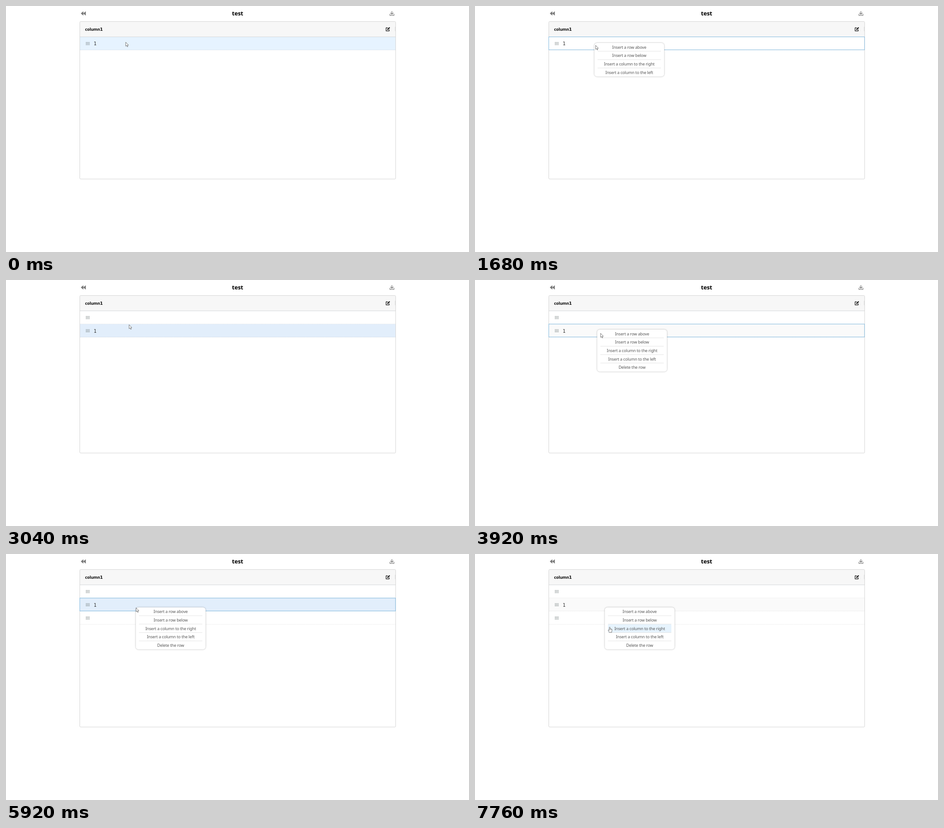
An HTML page for the animation above (8 s loop, 1026 by 546 pixels).

```html
<!DOCTYPE html>
<html lang="en">
<head>
<meta charset="utf-8">
<title>Table editor</title>
<style>
  html, body { margin: 0; width: 100%; height: 100%; overflow: hidden; background: #fff; }
  svg { display: block; width: 1026px; height: 546px; }
  text { font-family: "Noto Sans", "Open Sans", sans-serif; }
  .digit { font-family: "DejaVu Sans", sans-serif; }
  .menu text { font-size: 9px; letter-spacing: -.15px; fill: #555; text-anchor: middle; }
  .panel { filter: drop-shadow(0 0 1.5px rgba(0, 0, 0, .32)); }
</style>
</head>
<body>
<svg viewBox="0 0 1026 546">
  <defs>
    <g id="grip" fill="none" stroke="#6f7a7a" stroke-width="1.25" stroke-dasharray="1.3 1">
      <path d="M0 .6H8.3M0 3.1H8.3M0 5.6H8.3"/>
    </g>
    <path id="arrow" d="M.3 .3V9.2L2.3 7.4L3.8 10.6L5.2 10L3.8 6.9H6.5Z"
      fill="#fff" stroke="#555" stroke-width=".8" stroke-linejoin="round"/>
    <g id="hand" fill="#fff" stroke="#555" stroke-width=".8" stroke-linejoin="round">
      <path d="M-1 .9Q0 -.5 1 .9V4L4.4 4.8Q5.4 5.2 5.3 6.5L4.5 9.8V12H-.6L-3 8.4Q-4 6.7 -2.4 6.4L-1 7.7Z"/>
      <path d="M1 4V6M2.5 4.5V6.3M3.9 4.8V6.5" stroke-width=".5"/>
    </g>
  </defs>

  <path d="M171.2 12.2V20.8L166 16.5ZM176.6 12.2V20.8L171.4 16.5Z" fill="#777" stroke="#777" stroke-width=".5" stroke-linejoin="round"/>
  <text x="513.1" y="21" font-size="13" font-weight="700" letter-spacing="-.2" text-anchor="middle">test</text>
  <g fill="none" stroke="#808080" stroke-width="1.4" stroke-linecap="round" stroke-linejoin="round">
    <path d="M855.2 12V18M852.2 15.5L855.2 18.4L858.2 15.5M850.8 18.2V20.9H859.7V18.2"/>
  </g>

  <rect x="163.5" y="34.5" width="700" height="349.5" rx="2" fill="#fff"/>
  <path d="M163.5 68.5V36.5Q163.5 34.5 165.5 34.5H861.5Q863.5 34.5 863.5 36.5V68.5Z" fill="#f7f7f7"/>
  <text x="175.3" y="54.6" font-size="9" font-weight="700" letter-spacing="-.1">column<tspan class="digit">1</tspan></text>
  <g fill="none" stroke="#111" stroke-width="1.2" stroke-linejoin="round">
    <path d="M846 48.3H842.3V55.4H849.2V52"/>
    <path d="M845 53L845.3 51.2L849.3 47.2L850.6 48.5L846.7 52.5Z" fill="#111" stroke-width=".8"/>
  </g>
  <path d="M862.3 46V56" stroke="#ddd"/>
  <g id="rows"></g>
  <path d="M163.5 68.5H863.5" stroke="#d4d8da"/>
  <rect x="163.5" y="34.5" width="700" height="349.5" rx="2" fill="none" stroke="#d4d4d4"/>
  <g id="overlay"></g>
</svg>
<script>
const LOOP = 8000, STEP = 80;
const TOP = 68.5, ROW = 29.3, ITEM = 18.65, MENU_W = 154.5, PAD = 7;
const LABELS = ["Insert a row above", "Insert a row below",
  "Insert a column to the right", "Insert a column to the left", "Delete the row"];

// Each context menu: selected row, place, and the times of its phases.
const MENUS = [
  { row: 0, x: 264.6, y: 82, items: 4, select: 1120, open: 1200, enter: 1680, press: 2160, close: 2480 },
  { row: 1, x: 270.8, y: 110, items: 5, select: 3200, open: 3520, enter: 3920, press: 4560, close: 4880 },
  { row: 1, x: 287.7, y: 118.6, items: 5, select: 5680, open: 5920, enter: 6560, press: 7760, close: LOOP }
];

// Pointer moves: first step, last step, end point.
const START = [265, 80];
const MOVES = [
  [480, 480, 265, 81], [880, 960, 265, 82.3], [1520, 1520, 265.4, 82.8],
  [1680, 1680, 267, 87], [1760, 2000, 273.5, 92], [2640, 2640, 273.7, 91.5],
  [2960, 3040, 272.5, 99], [3120, 3200, 271, 109.5], [3920, 3920, 278, 118],
  [4000, 4400, 288.5, 134.5], [4880, 4960, 289, 133], [5440, 5680, 288, 119],
  [6560, 6960, 296, 130], [7040, 7360, 297, 147], [7440, 7680, 298.5, 162]
];

const rows = document.getElementById("rows");
const overlay = document.getElementById("overlay");

function pointerAt(t) {
  let [x, y] = START;
  for (const [first, last, endX, endY] of MOVES) {
    if (t < first) break;
    const p = Math.min(1, (t - first + STEP) / (last - first + STEP));
    x += (endX - x) * p;
    y += (endY - y) * p;
  }
  return { x, y };
}

function drawRow(i, value, hovered) {
  const y = TOP + i * ROW, odd = i % 2;
  const fill = hovered ? (odd ? "#e2eefb" : "#e6f3ff") : (odd ? "#fafafa" : "#fff");
  return `<rect x="164" y="${y}" width="699" height="${ROW}" fill="${fill}"/>
    <path d="M164 ${y + ROW - .3}H863" stroke="#000" stroke-opacity=".12" stroke-width=".8" stroke-dasharray="1.4 .7"/>
    <use href="#grip" x="177" y="${y + 11.8}"/>
    <text class="digit" x="194.5" y="${y + 18.8}" font-size="9.8" fill="#222">${value}</text>`;
}

function drawMenu({ x, y, items }, active) {
  let out = `<rect class="panel" x="${x}" y="${y}" width="${MENU_W}" height="${items * ITEM}" rx="6" fill="#fff"/>`;
  for (let i = 0; i < items; i++) {
    const top = y + i * ITEM;
    if (i === active)
      out += `<rect x="${x + PAD}" y="${top}" width="${MENU_W - 2 * PAD}" height="${ITEM}" rx="2" fill="#e6f3fd"/>`;
    if (i) out += `<path d="M${x + PAD} ${top - .3}h${MENU_W - 2 * PAD}" stroke="#ddd" stroke-width=".8"/>`;
    out += `<text x="${x + MENU_W / 2}" y="${top + 12.8}">${LABELS[i]}</text>`;
  }
  return `<g class="menu">${out}</g>`;
}

function render(t) {
  const p = pointerAt(t);
  const values = t < 2480 ? ["1"] : t < 4880 ? ["", "1"] : ["", "1", ""];
  const menu = MENUS.find(m => t >= m.open && t < m.close);
  const selected = MENUS.find(m => t >= m.select && t < m.press);
  const inside = menu && t >= menu.enter;
  const overItem = inside && p.x >= menu.x + PAD + 1;
  const active = overItem ? Math.floor((p.y - menu.y) / ITEM) : -1;
  const hovered = inside ? -1 : Math.floor((p.y - TOP) / ROW);

  rows.innerHTML = values.map((v, i) => drawRow(i, v, i === hovered)).join("");
  let out = "";
  if (selected)
    out += `<rect x="163.5" y="${TOP + selected.row * ROW}" width="699.7" height="${ROW - .6}" fill="none" stroke="#7fb7dd"/>`;
  if (menu) out += drawMenu(menu, active);
  out += `<use href="#${overItem ? "hand" : "arrow"}" x="${p.x}" y="${p.y}"/>`;
  overlay.innerHTML = out;
}

const began = performance.now();
let shown = -1;
function tick() {
  const t = (performance.now() - began) % LOOP;
  const step = Math.floor(t / STEP);
  if (step !== shown) render((shown = step) * STEP);
  requestAnimationFrame(tick);
}
tick();
</script>
</body>
</html>
```
